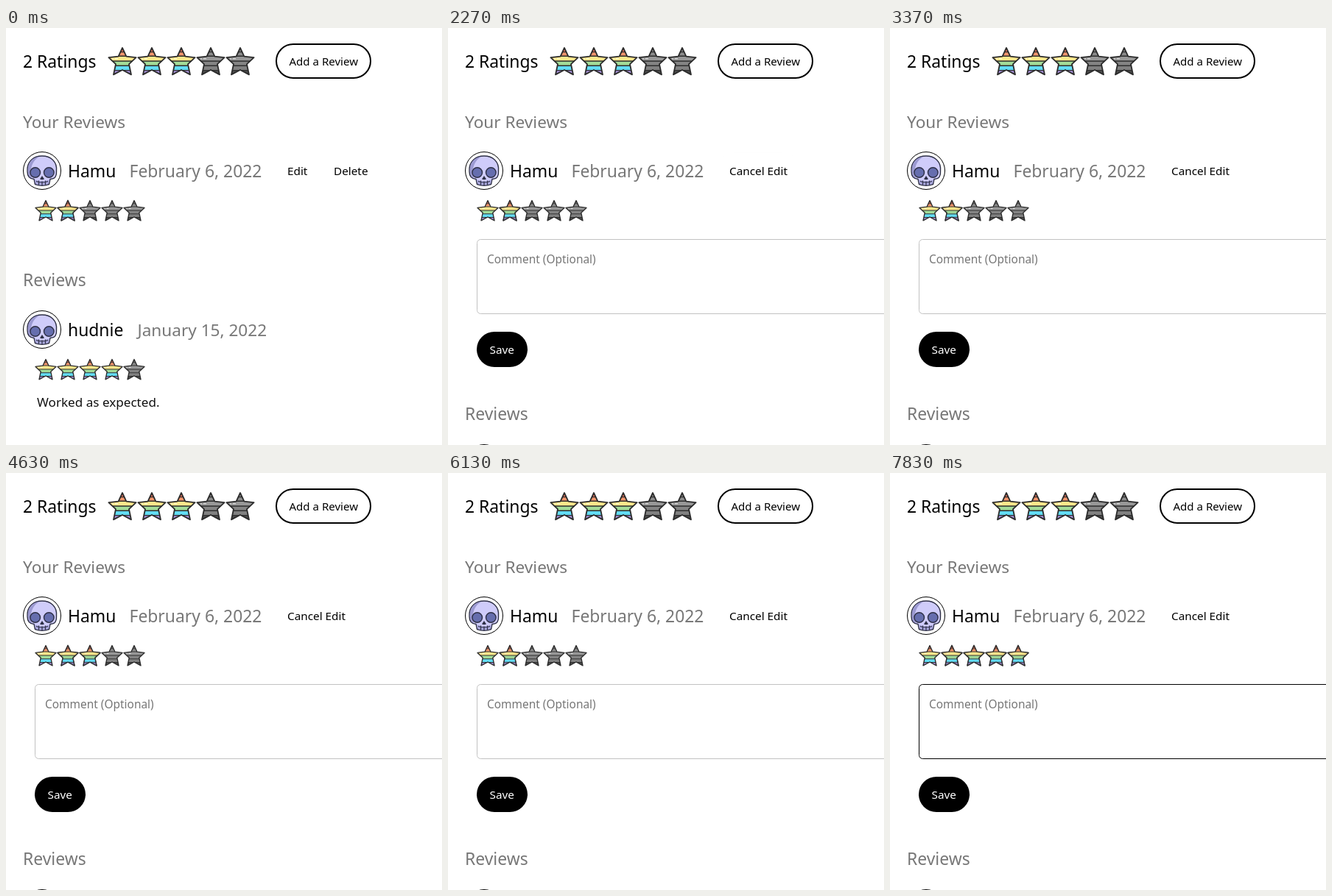
Animation of 592 by 567 pixels, one loop 8 s. Source, as an HTML page:

```html
<!DOCTYPE html>
<html lang="en">
<head>
<meta charset="utf-8">
<title>Reviews</title>
<style>
  html, body { margin: 0; width: 100%; height: 100%; overflow: hidden; background: #fff; }
  svg { display: block; }
  text { font: 15.3px "Noto Sans", "Open Sans", sans-serif; fill: #000; white-space: pre; }
  .big { font-size: 22.9px; }
  .body { font-size: 17.1px; fill: #111; }
  .grey { fill: #777; }
  .hover { fill: #ebebeb; }

  .list, .form, .fade, .star2, .star3, .star4, .star5, .field { animation: 8s infinite step-end; }
  .list { animation-name: list; }
  .form { animation-name: form; }
  .fade { animation-timing-function: ease-in-out; }
  .editHover { animation-name: editHover; }
  .cancelHover { animation-name: cancelHover; }
  .star2 { animation-name: star2; }
  .star3 { animation-name: star3; }
  .star4 { animation-name: star4; }
  .star5 { animation-name: star5; }
  .field { fill: #fff; stroke: #c2c2c2; animation-name: field; }

  @keyframes list { 0% { opacity: 1 } 28.375%, 100% { opacity: 0 } }
  @keyframes form { 0% { opacity: 0 } 28.375%, 100% { opacity: 1 } }
  @keyframes editHover { 0%, 15% { opacity: 0 } 17.875%, 100% { opacity: 1 } }
  @keyframes cancelHover {
    0%, 28.25% { opacity: 0 }
    31.25%, 39.4% { opacity: 1 }
    40.4%, 100% { opacity: 0 }
  }
  /* the rating follows the pointer: 2, 3, 4, 5, back down to 1, up to 5 */
  @keyframes star2 { 0% { opacity: 1 } 70% { opacity: 0 } 76.625%, 100% { opacity: 1 } }
  @keyframes star3 { 0% { opacity: 0 } 57.875% { opacity: 1 } 68.75% { opacity: 0 } 77.875%, 100% { opacity: 1 } }
  @keyframes star4 { 0% { opacity: 0 } 59.125% { opacity: 1 } 67.125% { opacity: 0 } 79.125%, 100% { opacity: 1 } }
  @keyframes star5 { 0% { opacity: 0 } 60% { opacity: 1 } 65% { opacity: 0 } 81.25%, 100% { opacity: 1 } }
  @keyframes field { 0% { stroke: #c2c2c2 } 97.875%, 100% { stroke: #000 } }
</style>
</head>
<body>
<svg width="592" height="567" viewBox="0 0 592 567">
  <defs>
    <path id="shape" d="M20 2 L25.4 13.6 L38.6 15.2 L29 24.2 L32 38.4 L20 32 L8 38.4 L11 24.2 L1.4 15.2 L14.6 13.6 Z"/>
    <clipPath id="cut"><use href="#shape"/></clipPath>
    <g id="lines">
      <path clip-path="url(#cut)" d="M0 7.6H40M0 13.2H40M0 20H40M0 26.2H40M0 32.6H40" stroke="#2e2e2e" stroke-width="1.4"/>
      <use href="#shape" fill="none" stroke="#2b2b2b" stroke-width="1.8" stroke-linejoin="round"/>
      <path d="M6 16.8H8M10 16.8H14" stroke="#fff" stroke-width="1.1" opacity=".8"/>
    </g>
    <symbol id="on" viewBox="0 0 40 40"><g id="onBands" clip-path="url(#cut)"></g><use href="#lines"/></symbol>
    <symbol id="off" viewBox="0 0 40 40"><g id="offBands" clip-path="url(#cut)"></g><use href="#lines" /></symbol>

    <g id="avatar">
      <circle r="25.5" fill="#fff" stroke="#000"/>
      <path d="M-20 1 C-21 -13 -11 -20 0 -20 C11 -20 21 -13 19.5 1 C20 7 18 11 11 11.5 L9.5 18.5 Q0 22 -9.5 18.5 L-11 11.5 C-18 11 -20 7 -20 1Z"
            fill="#cfccfa" stroke="#2d2f45" stroke-width="1.4" stroke-linejoin="round"/>
      <path d="M-19.2 1 C-20 -12 -12 -18 -4 -19 C-12 -14 -15 -7 -15 1 L-14 10 Q-19 8 -19.2 1Z" fill="#9c9ad2"/>
      <path d="M-10 12 L-8.8 18 Q0 21 8.8 18 L10 12 Q0 17 -10 12Z" fill="#a9a7dc"/>
      <g fill="#666eae" stroke="#2d2f45" stroke-width="1.4">
        <circle cx="-9.3" cy="2.5" r="6.8"/>
        <circle cx="9.3" cy="2.5" r="6.8"/>
      </g>
      <path d="M0 7 L-3 11.5 Q0 13 3 11.5Z" fill="#2d2f45"/>
      <path d="M-8 14.5 Q0 17 8 14.5 M-4.5 13.5V19 M0 14.5V20 M4.5 13.5V19" fill="none" stroke="#2d2f45" stroke-width="1.2"/>
    </g>

    <g id="reviewsHead"><text class="big grey" x="23" y="351">Reviews</text><use href="#avatar" x="49" y="410"/></g>
  </defs>

  <rect width="592" height="567" fill="#fff"/>

  <text class="big" x="23" y="54">2 Ratings</text>
  <g id="average"></g>
  <rect x="367" y="22" width="128" height="46" rx="23" fill="#fff" stroke="#000" stroke-width="2"/>
  <text x="384.5" y="51" style="font-size:15.05px">Add a Review</text>

  <text class="big grey" x="23" y="136" style="font-size:22.6px">Your Reviews</text>
  <use href="#avatar" x="49" y="194"/>
  <text class="big" x="84" y="203">Hamu</text>
  <text class="big grey" x="167.5" y="203">February 6, 2022</text>
  <g id="mine"></g>

  <g class="list">
    <rect class="hover fade editHover" x="363.5" y="169.5" width="64" height="49.5" rx="24.7"/>
    <text x="382" y="200">Edit</text>
    <text x="445" y="200">Delete</text>
    <use href="#reviewsHead"/>
    <text class="big" x="84" y="419">hudnie</text>
    <text class="big grey" x="178.5" y="419" style="font-size:22.6px">January 15, 2022</text>
    <g id="theirs"></g>
    <text class="body" x="42" y="515">Worked as expected.</text>
  </g>

  <g class="form">
    <rect class="hover fade cancelHover" x="363.5" y="169.5" width="115.5" height="49.5" rx="24.7"/>
    <text x="382" y="200">Cancel Edit</text>
    <rect class="field" x="39.5" y="287.5" width="600" height="101" rx="5"/>
    <text class="grey" x="53" y="320" style="font-size:15.45px">Comment (Optional)</text>
    <rect x="39" y="413" width="69" height="48" rx="24"/>
    <text x="56.5" y="443" style="fill:#fff;font-weight:500">Save</text>
    <use href="#reviewsHead" y="182"/>
  </g>
</svg>
<script>
  const el = (parent, tag, attrs) => {
    const node = document.createElementNS("http://www.w3.org/2000/svg", tag);
    for (const key in attrs) node.setAttribute(key, attrs[key]);
    document.getElementById(parent).append(node);
  };

  const edges = [0, 7.6, 13.2, 20, 26.2, 32.6, 40];
  const bands = (id, colors) => colors.forEach((fill, i) =>
    el(id, "rect", { y: edges[i], width: 40, height: edges[i + 1] - edges[i], fill }));
  bands("onBands", ["#e8705c", "#f0936b", "#ffe88c", "#a3dc98", "#62dcf4", "#a58fd6"]);
  bands("offBands", ["#858585", "#8a8a8a", "#989898", "#848484", "#808080", "#4c4c4c"]);

  // a rating row; live rows switch stars 2 to 5 through their keyframes
  const row = (id, x, y, size, count, live) => {
    for (let i = 0; i < 5; i++) {
      const box = { x: x + i * size, y, width: size, height: size };
      const animated = live && i > 0;
      if (animated || i >= count) el(id, "use", { href: "#off", ...box });
      if (animated) el(id, "use", { href: "#on", class: "star" + (i + 1), ...box });
      else if (i < count) el(id, "use", { href: "#on", ...box });
    }
  };
  row("average", 138, 25, 40, 3);
  row("mine", 39, 233, 30, 2, true);
  row("theirs", 39, 449, 30, 4);
</script>
</body>
</html>
```
